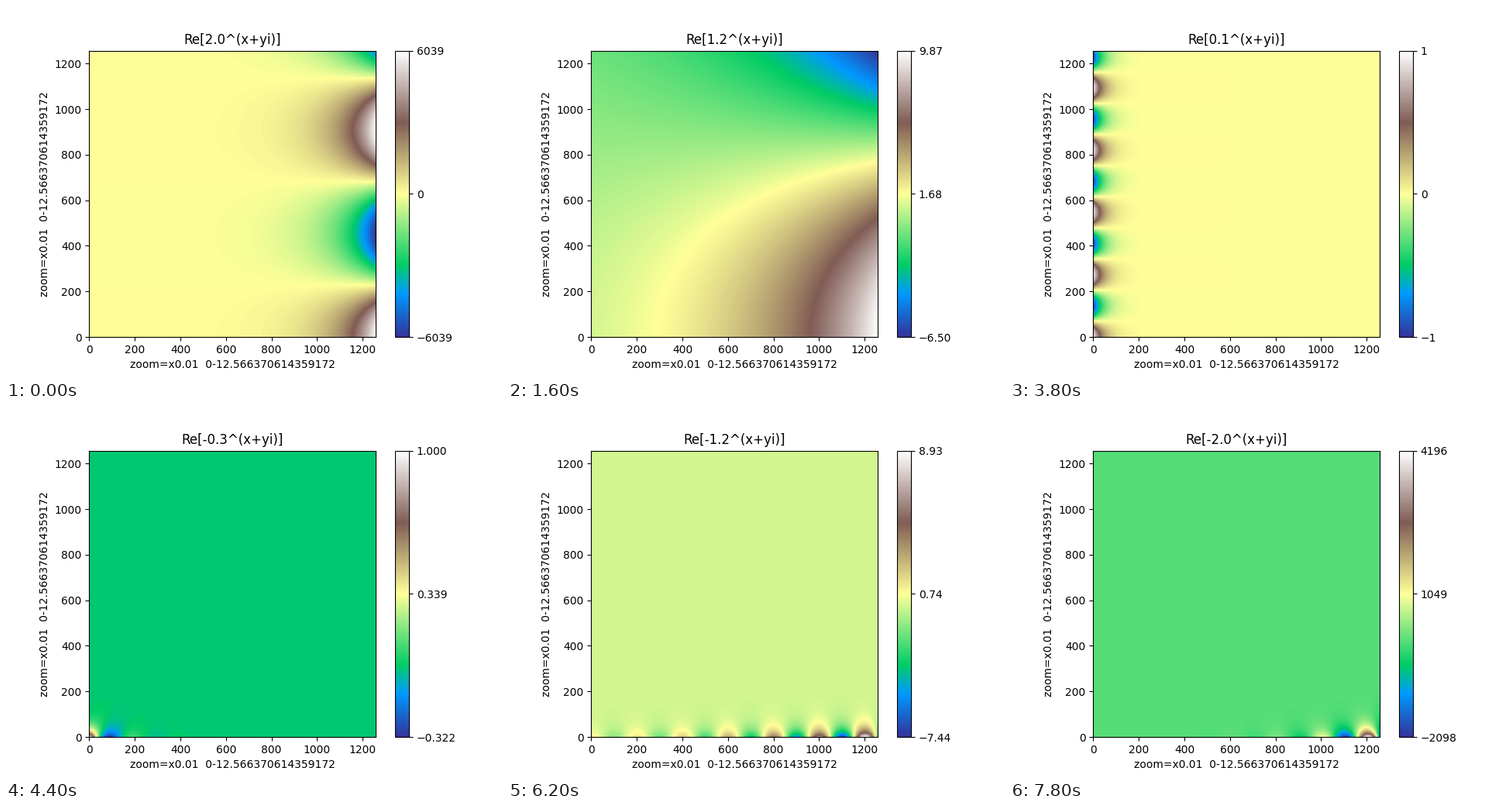
A matplotlib script that plays this animation: 640 px wide and 480 px high, repeating every 8000 ms.

```python
import numpy as np
import matplotlib.pyplot as plt
from matplotlib.animation import FuncAnimation

STEP = 0.01
SPAN = 4 * np.pi
# 2.0 down to -2.0 in tenths, skipping zero
BASES = [n / 10 for n in range(20, -21, -1) if n != 0]

axis = np.arange(0, SPAN, STEP)
X, Y = axis[np.newaxis, :], axis[:, np.newaxis]


def real_power(base):
    """Real part of base ** (x + iy) on the principal branch."""
    a = np.log(abs(base))
    b = np.pi if base < 0 else 0.0
    return np.exp(a * X - b * Y) * np.cos(b * X + a * Y)


fig, ax = plt.subplots(figsize=(6.4, 4.8), dpi=100)
im = ax.imshow(real_power(BASES[0]), cmap="terrain", origin="lower")
cbar = fig.colorbar(im)
label = f"zoom=x{STEP}  0-{SPAN}"
ax.set_xlabel(label)
ax.set_ylabel(label)


def update(i):
    base = BASES[i]
    data = real_power(base)
    lo, hi = data.min(), data.max()
    im.set_data(data)
    if hi > lo:
        im.set_clim(lo, hi)
    else:
        im.set_clim(0.9 * lo, 1.1 * hi)
    cbar.set_ticks([lo, (lo + hi) / 2, hi])
    ax.set_title(f"Re[{base:.1f}^(x+yi)]")


anim = FuncAnimation(fig, update, frames=len(BASES), interval=200,
                     repeat=True, repeat_delay=0)
plt.show()
```
